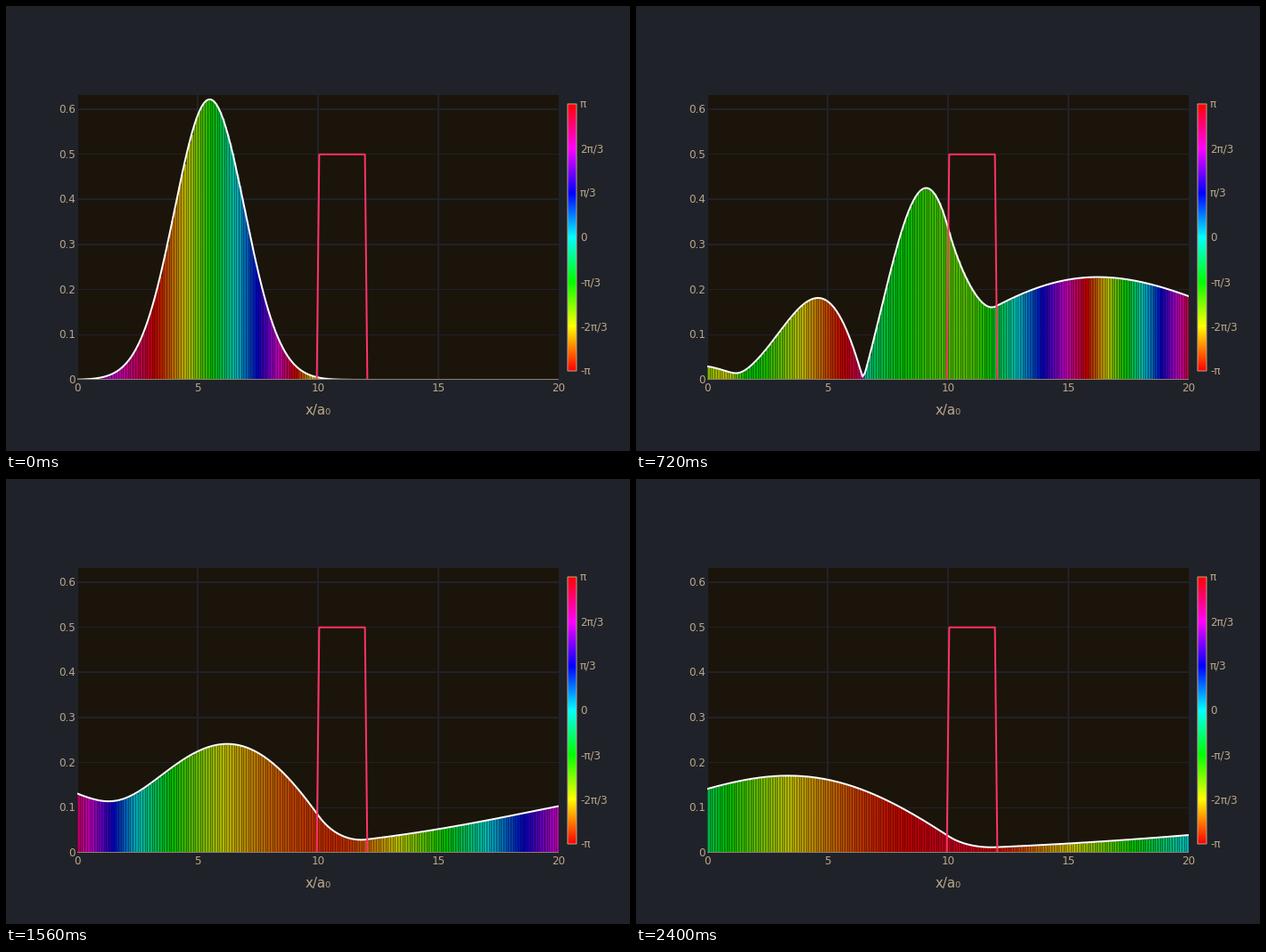
These frames come from a looping animation (700x500 px, 2.44 s). A matplotlib script:

```python
import math

import numpy as np
import matplotlib.pyplot as plt
from matplotlib.animation import FuncAnimation
from matplotlib.collections import PolyCollection
from matplotlib.colors import hsv_to_rgb
from matplotlib.patches import Rectangle

W, H, DPI = 700, 500, 100
PX = 72 / DPI                      # one pixel in points
FRAMES, INTERVAL = 61, 40
PAPER, PLOT, TEXT = "#1f2229", "#1b140b", "#bda789"
PINK, AXIS = "#ff3366", "#8f8070"
Y_MAX = (2 * np.pi) ** -0.25       # peak of the packet at t = 0
PIXEL = Y_MAX / 320                # one pixel on the y axis

# Wave packet meeting a barrier, in atomic units
DX, N = 0.1, 4096
X0, K0, DT, STEPS = 5, 1, 0.005, 100
x = DX * (np.arange(N) - 2000 + 0.5)
k = 2 * np.pi * np.fft.fftfreq(N, DX)
barrier = np.where((x > 10) & (x < 12), 0.5, 0.0)
view = (x > -0.1) & (x < 20.1)
xs = x[view]


def evolve():
    """Split-step solution, one row for each frame."""
    psi = Y_MAX * np.exp(-(x - X0) ** 2 / 4 + 1j * K0 * x)
    half_v = np.exp(-0.5j * DT * barrier)
    full_v = half_v ** 2
    kinetic = np.exp(-0.5j * DT * k ** 2)
    rows = []
    for _ in range(FRAMES):
        psi = psi * half_v
        for step in range(STEPS):
            psi = np.fft.ifft(kinetic * np.fft.fft(psi))
            psi *= full_v if step < STEPS - 1 else half_v
        rows.append(psi[view])
    return np.array(rows)


def phase_colors(phase, value=1.0):
    hue = ((phase + np.pi) / (2 * np.pi)) % 1
    return hsv_to_rgb(np.stack(
        [hue, np.ones_like(hue), np.full_like(hue, value)], axis=-1))


waves = evolve()

fig = plt.figure(figsize=(W / DPI, H / DPI), dpi=DPI, facecolor=PAPER)


def panel(left, top, width, height):
    ax = fig.add_axes([left / W, 1 - (top + height) / H, width / W, height / H])
    ax.set_axis_off()
    return ax


def label(px, py, text, size=12, ha="center"):
    fig.text(px / W, 1 - py / H, text, fontsize=size * PX, color=TEXT,
             family="DejaVu Sans", ha=ha, va="baseline")


# Main plot
ax = panel(80, 100, 540, 320)
ax.set_xlim(0, 20)
ax.set_ylim(0, Y_MAX)
ax.add_patch(Rectangle((0, 0), 20, Y_MAX, color=PLOT, lw=0, zorder=0))
for gx in (0, 5, 10, 15):
    ax.axvline(gx, color=PAPER, lw=2 * PX, zorder=1)
for i in range(1, 7):
    up = math.ceil(i / 10 / PIXEL)   # whole pixels above the axis
    ax.axhline(up * PIXEL, color=PAPER, lw=(2 if i in (3, 4, 6) else 1) * PX,
               zorder=1)

bars = PolyCollection([], linewidths=0.7 * PX, edgecolors=(0, 0, 0, 0.2),
                      zorder=2)
ax.add_collection(bars, autolim=False)
curve, = ax.plot([], [], color="white", lw=2 * PX, zorder=3)
ax.plot(xs, barrier[view], color=PINK, lw=2 * PX, zorder=4)
ax.add_patch(Rectangle((0, 0), 20, PIXEL, color=AXIS, lw=0, zorder=5))

for i in range(7):
    label(78, 424 - i / 10 / PIXEL, f"{i / 10:g}", ha="right")
for gx in range(0, 21, 5):
    label(80 + 27 * gx, 433, str(gx))
label(350, 459, "x/a₀", size=15)

# Phase scale
scale = panel(630, 110, 10, 300)
ramp = phase_colors(np.linspace(-np.pi, np.pi, 300))[:, None]
scale.imshow(ramp, origin="lower", aspect="auto", extent=(0, 1, 0, 1))
scale.add_patch(Rectangle((0, 0), 1, 1, fill=False, ec=TEXT, lw=PX,
                          clip_on=False, snap=False))
for i, name in enumerate(("π", "2π/3", "π/3", "0", "-π/3", "-2π/3", "-π")):
    label(644, 114 + 50 * i, name, ha="left")


def draw(frame):
    psi = waves[frame]
    height = np.abs(psi)
    left, right, zero = xs - DX / 2, xs + DX / 2, np.zeros_like(xs)
    corners = [(left, zero), (left, height), (right, height), (right, zero)]
    bars.set_verts(np.stack([np.stack(c, axis=-1) for c in corners], axis=1))
    bars.set_facecolor(phase_colors(np.angle(psi), 0.7))
    curve.set_data(xs, height)
    return bars, curve


anim = FuncAnimation(fig, draw, frames=FRAMES, interval=INTERVAL,
                     init_func=lambda: draw(0), repeat=True)
plt.show()
```
